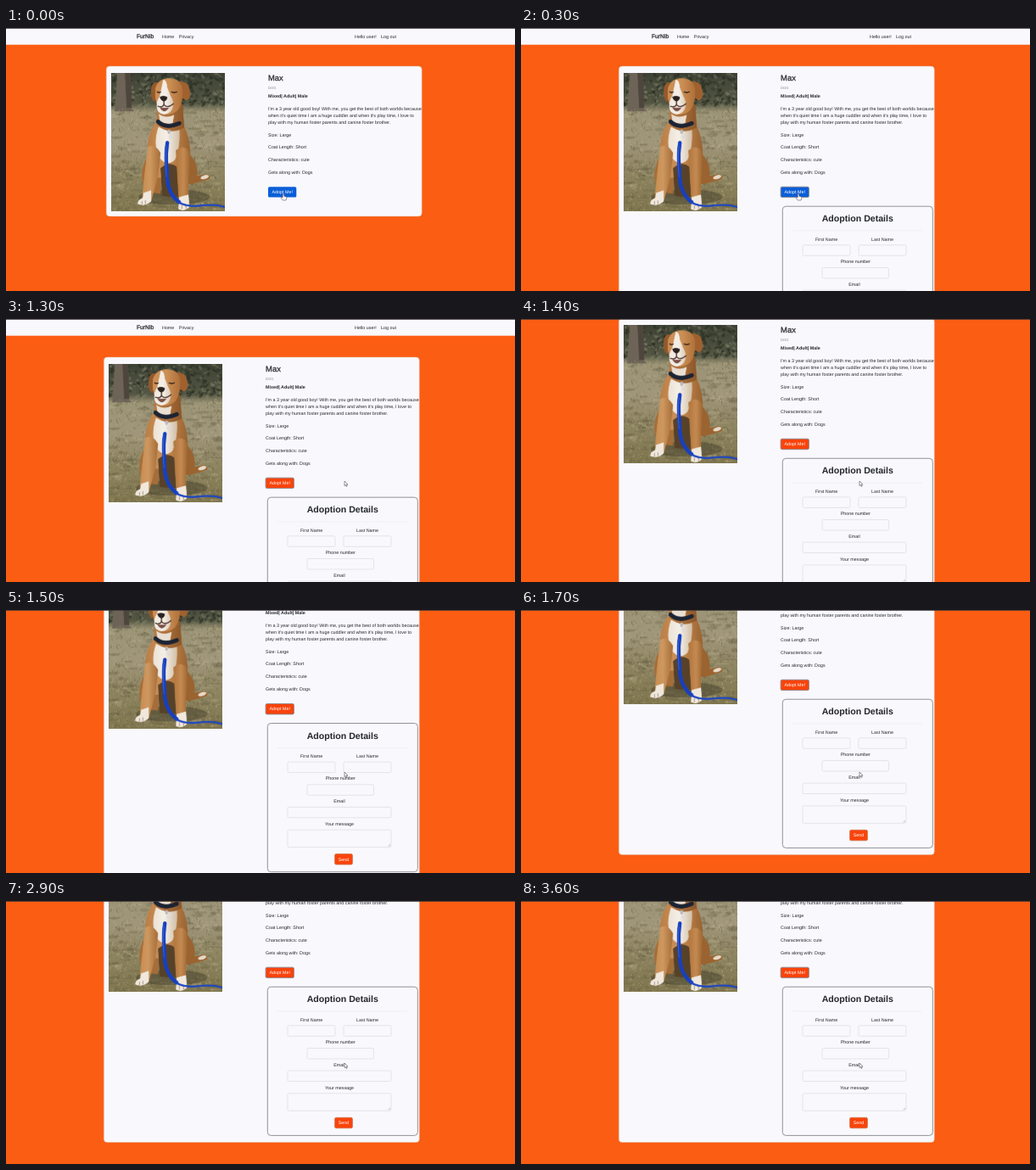
An HTML page with a canvas for the animation above (3.7 s loop, 600 by 310 pixels).

```html
<!DOCTYPE html>
<html lang="en">
<head>
<meta charset="utf-8">
<title>Pet adoption page</title>
<style>
html, body { margin: 0; width: 100%; height: 100%; overflow: hidden; background: #fb5d12; }
canvas { display: block; }
</style>
</head>
<body>
<canvas id="stage" width="600" height="310"></canvas>
<script>
const ctx = document.getElementById('stage').getContext('2d');
const LOOP = 3700, STEP = 100;
const SCROLL_END = 109;
const PAPER = '#f9f8fc', INK = '#25282c', ORANGE = '#fb5d12', HOT = '#fa430b';
const BODY = 5.37;

const clamp = v => Math.max(0, Math.min(1, v));

// "heavy" adds a hairline outline for a medium weight.
function text(str, x, y, { size = BODY, color = INK, weight = 400, align = 'left', heavy = false } = {}) {
  const zoom = 4;
  ctx.save();
  ctx.translate(x, y);
  ctx.scale(1 / zoom, 1 / zoom);
  ctx.font = `${weight} ${size * zoom}px "Liberation Sans", Arial, sans-serif`;
  ctx.textRendering = 'geometricPrecision';
  ctx.textAlign = align;
  ctx.fillStyle = ctx.strokeStyle = color;
  ctx.fillText(str, 0, 0);
  if (heavy) {
    ctx.lineWidth = 1;
    ctx.strokeText(str, 0, 0);
  }
  ctx.restore();
}

function box(x, y, w, h, r, fill, stroke, line = 1) {
  ctx.beginPath();
  ctx.roundRect(x, y, w, h, r);
  if (fill) { ctx.fillStyle = fill; ctx.fill(); }
  if (stroke) { ctx.strokeStyle = stroke; ctx.lineWidth = line; ctx.stroke(); }
}

// ---- Dog picture, painted once ----
function paintPhoto() {
  const W = 134, H = 163, zoom = 2;
  const photo = document.createElement('canvas');
  photo.width = W * zoom;
  photo.height = H * zoom;
  const c = photo.getContext('2d');
  c.scale(zoom, zoom);
  c.lineCap = 'round';

  let seed = 7;
  const rnd = () => (seed = (seed * 16807) % 2147483647) / 2147483647;
  const shape = (color, path) => { c.fillStyle = color; c.fill(new Path2D(path)); };
  const oval = (color, x, y, rx, ry, turn = 0) => {
    c.fillStyle = color;
    c.beginPath();
    c.ellipse(x, y, rx, ry, turn, 0, 7);
    c.fill();
  };
  const stroke = (color, width, path) => {
    c.strokeStyle = color;
    c.lineWidth = width;
    c.stroke(new Path2D(path));
  };
  const ramp = (x0, x1, ...colors) => {
    const g = c.createLinearGradient(x0, 0, x1, 0);
    colors.forEach((color, i) => g.addColorStop(i / (colors.length - 1), color));
    return g;
  };

  const ground = c.createLinearGradient(0, 0, 0, H);
  ground.addColorStop(0, '#3e4235');
  ground.addColorStop(0.22, '#565844');
  ground.addColorStop(0.28, '#9c9476');
  ground.addColorStop(0.5, '#a0967a');
  ground.addColorStop(0.75, '#8c835f');
  ground.addColorStop(1, '#80774f');
  c.fillStyle = ground;
  c.fillRect(0, 0, W, H);

  // foliage, trunk, grass with dappled shade
  for (let i = 0; i < 420; i++) {
    oval(['#20261d88', '#8a8c7466', '#474c3a88', '#2d342888'][i % 4],
      rnd() * W, rnd() * 38, 0.6 + rnd() * 3, 0.5 + rnd() * 1.8, rnd() * 3);
  }
  shape('#6d6357', 'M7 0H23L24 41L27 45H4Z');
  shape('#3d362fa0', 'M16 0H23L24 41H18Z');
  for (let i = 0; i < 150; i++) {
    oval(['#514c3240', '#c4b99540', '#645d3f40'][i % 3],
      rnd() * W, 46 + rnd() * 115, 2 + rnd() * 7, 0.7 + rnd() * 2);
  }
  c.globalAlpha = 0.45;
  for (let i = 0; i < 1300; i++) {
    const x = rnd() * W, y = 42 + rnd() * 121;
    stroke(['#4f4b30', '#c8bd99', '#716947', '#b0a580'][i % 4], 0.7,
      `M${x} ${y}l${rnd() * 4 - 2} ${-0.6 - rnd() * 2.6}`);
  }
  c.globalAlpha = 1;
  oval('#3c382575', 74, 146, 42, 9);

  // haunches and body
  shape('#a66d38', 'M46 94C34 108 34 125 40 140L58 142L60 104Z');
  shape('#9a632f', 'M81 88C96 94 103 109 101 121L112 119Q118 121 115 125L94 131L81 128Z');
  oval('#e6d9c9', 110, 122.5, 5, 2.2, -0.3);
  shape(ramp(42, 96, '#ba7d44', '#c98f57', '#b67b43', '#925e30'),
    'M55 55C44 67 41 84 44 101L48 123L88 124C95 106 96 80 83 57Z');
  shape('#574229', 'M58 112Q69 102 79 112L80 146L60 145Z');
  shape(ramp(48, 83, '#e9dfd1', '#f5efe6', '#cbb69c'),
    'M56 62Q69 73 80 64Q82 86 75 102Q66 111 57 100Q48 84 56 62Z');
  // forelegs
  shape(ramp(34, 58, '#c58a50', '#cf985f', '#a56d39'),
    'M43 87Q51 82 58 94L55 121L47 151L36 152Q38 125 43 87Z');
  shape(ramp(76, 94, '#b0763e', '#c58a50', '#97622f'),
    'M76 91Q87 82 93 95L91 125L91 156L80 157L78 127Z');
  shape('#f0e8dd', 'M38 141L47 138L47 151Q39 158 31 154Q31 149 37 147Z');
  shape('#f0e8dd', 'M80 146L91 143L92 158Q85 164 79 160Z');
  stroke('#80674f', 0.6, 'M36 151v4M40 150v4M83 156v4M88 156v4');

  // neck, ears and head
  shape(ramp(53, 86, '#b87a42', '#a96d38', '#8a562a'), 'M54 42L84 36L86 64Q69 74 53 61Z');
  shape('#e9dfd2', 'M56 48Q64 54 74 49L72 61Q63 63 57 57Z');
  shape('#96592b', 'M56 11Q47 9 47 21Q46 30 51 34L57 23Z');
  shape('#a0612f', 'M79 10Q91 9 92 19Q95 28 89 32Q83 31 80 22Z');
  shape(ramp(51, 86, '#cb8f56', '#cc8f55', '#aa6c36'),
    'M52 17Q56 6 68 6Q82 6 84 19Q85 35 78 44Q69 51 59 47Q50 36 52 17Z');
  shape(ramp(53, 76, '#f2ebe2', '#f4eee6', '#d3bea5'),
    'M61 8Q65 7 66 17L70 27Q76 37 70 45Q62 52 55 45Q51 36 57 27Z');
  stroke('#3a271c', 1.4, 'M54 22q2 1.4 4 .2M71 22q3 1.6 6 0');
  shape('#2a211f', 'M57 28Q61 25.5 66 28Q66 32 62 33.5Q58 32 57 28Z');
  stroke('#4c332c', 1.4, 'M62 33V37M55 39Q60 41 62 37Q66 42 73 36');
  shape('#7a4d44', 'M57 40.5Q62 41 68 40.5Q65 45 62 45Q59 44 57 40.5Z');
  // collar and leash
  stroke('#1c2333', 5, 'M55 57Q64 66 80 59');
  oval('#b8bbc4', 68, 69, 1.8, 2.6);
  oval('#dadbe0', 70, 75, 1.8, 2.2);
  stroke('#1640c0', 4.4, 'M66 82Q64 95 65 108L66 126Q68 143 80 152');
  stroke('#1c46c2', 2.2, 'M79 152Q89 158 106 156T134 158');
  stroke('#4468cf', 0.8, 'M65 86Q63 100 65 122');
  return photo;
}
const photo = paintPhoto();

// ---- Page parts ----
function nav() {
  ctx.fillStyle = PAPER;
  ctx.fillRect(0, 0, 600, 19.7);
  text('FurNib', 154, 12.3, { size: 6.72, heavy: true });
  text('Home', 184, 12);
  text('Privacy', 203.8, 12);
  text('Hello user!', 411, 12);
  text('Log out', 442, 12);
}

function button(label, x, y, w, color, ring) {
  box(x, y, w, 12.4, 1.6, color, ring, 0.9);
  text(label, x + w / 2, y + 8, { color: '#fff', align: 'center' });
}

function field(label, x, y, w, h = 12.5) {
  text(label, x + w / 2, y - 5.3, { align: 'center' });
  box(x, y, w, h, 1.5, PAPER, '#dfe0e5', 0.8);
}

function form() {
  box(308.3, 210.2, 177, 175.2, 4, null, '#929398');
  text('Adoption Details', 396.8, 228.3, { size: 10.6, weight: 700, align: 'center' });
  ctx.fillStyle = '#ecebef';
  ctx.fillRect(320, 238.6, 153, 0.7);
  field('First Name', 332, 255.8, 56);
  field('Last Name', 398, 255.8, 56);
  field('Phone number', 355, 282.5, 78.5);
  field('Email', 332, 309, 122);
  field('Your message', 332, 335.8, 122, 20.5);
  ctx.beginPath();
  ctx.moveTo(450.5, 355.2); ctx.lineTo(453, 352.7);
  ctx.moveTo(452, 355.2); ctx.lineTo(453, 354.2);
  ctx.strokeStyle = '#929398';
  ctx.lineWidth = 0.5;
  ctx.stroke();
  button('Send', 387.6, 364.3, 20.8, HOT, '#d0764f');
}

function card(open, buttonColor) {
  const left = open ? 115.3 : 118.2;
  const x = left + 190.8;
  box(left, 45, 372, open ? 348.5 : 177, 4, PAPER, '#dcab94', 0.5);
  ctx.imageSmoothingQuality = 'high';
  ctx.drawImage(photo, left + 6, 53.3, 134, 163);

  text('Max', x, 62.2, { size: 9.4, heavy: true });
  text('DOG', x, 71.6, { size: 4.1, color: '#85878c' });
  text('Mixed| Adult| Male', x, 82, { weight: 700 });
  ["I'm a 3 year old good boy! With me, you get the best of both worlds because",
   "when it's quiet time I am a huge cuddler and when it's play time, I love to",
   'play with my human foster parents and canine foster brother.'
  ].forEach((line, i) => text(line, x, 96.7 + i * 8.06));
  ['Size: Large', 'Coat Length: Short', 'Characteristics: cute', 'Gets along with: Dogs']
    .forEach((line, i) => text(line, x, 127.5 + i * 14.7));
  button('Adopt Me!', x, 187.2, 33.3, buttonColor, open ? '#8b8990' : null);
  if (open) form();
}

function cursor(x, y, hand) {
  ctx.save();
  ctx.translate(x, y);
  const outline = new Path2D(hand
    ? 'M-.8 .8Q0-.4 .8.8V3.2L3.4 4Q4.2 4.6 3.7 6L3 8H-.8L-3 5Q-2.8 3.8-.8 5Z'
    : 'M0 0V5.6L1.3 4.4 2.3 6.5 3.2 6 2.3 4.1H4Z');
  ctx.fillStyle = '#fff';
  ctx.fill(outline);
  ctx.strokeStyle = hand ? '#5b4c58' : '#4a4a51';
  ctx.lineWidth = 0.6;
  ctx.stroke(outline);
  ctx.restore();
}

function draw(t) {
  const open = t >= 100;
  const move = clamp((t - 600) / 600);
  const glide = move * move * (3 - 2 * move);
  const pointerX = 327 + 72 * glide;
  const overButton = pointerX < 340;
  const scroll = SCROLL_END * (1 - (1 - clamp((t - 1300) / 600)) ** 3);

  ctx.fillStyle = ORANGE;
  ctx.fillRect(0, 0, 600, 310);
  ctx.save();
  ctx.translate(0, -scroll);
  nav();
  card(open, overButton ? '#0b5ed7' : HOT);
  ctx.restore();
  ctx.fillStyle = '#3b3438';
  ctx.fillRect(0, 0, 600, 0.8);
  cursor(pointerX, 195 - 4 * glide, overButton);
}

const start = performance.now();
function tick() {
  const t = (performance.now() - start) % LOOP;
  draw(Math.floor(t / STEP) * STEP);
  requestAnimationFrame(tick);
}
tick();
</script>
</body>
</html>
```
